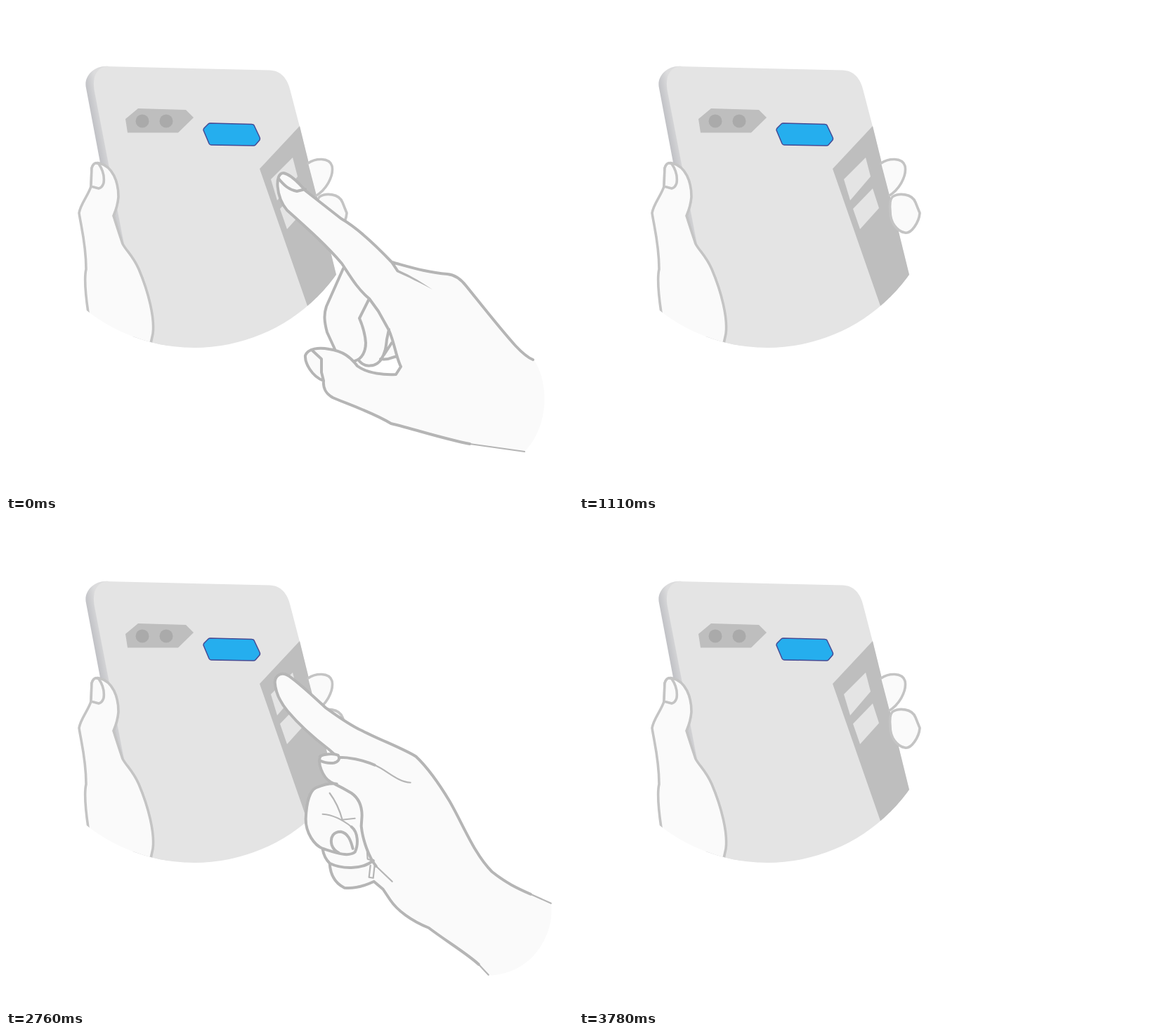
These frames come from a looping animation (807 by 694 pixels, 3950 ms). An HTML page:

```html
<!DOCTYPE html>
<html lang="en">
<head>
<meta charset="utf-8">
<title>Hand tapping a device</title>
<style>
  html, body { margin: 0; width: 100%; height: 100%; overflow: hidden; background: #fff; }
  svg { display: block; width: 807px; height: 694px; }
  path { stroke-linejoin: round; stroke-linecap: round; }
  .skin { fill: #fafafa; }
  .line { fill: none; stroke: #b5b5b5; stroke-width: 4; }
  .thin { fill: none; stroke: #b5b5b5; stroke-width: 2.2; }
  .holder { fill: #fafafa; stroke: #c4c4c4; stroke-width: 3.6; }
</style>
</head>
<body>
<svg viewBox="0 0 807 694">
  <defs>
    <clipPath id="disc"><circle cx="268" cy="239" r="248"/></clipPath>
    <linearGradient id="edge" gradientUnits="userSpaceOnUse" x1="116" y1="152" x2="136" y2="148">
      <stop offset="0" stop-color="#b9babf"/>
      <stop offset="1" stop-color="#dcdcdd"/>
    </linearGradient>
  </defs>

  <g clip-path="url(#disc)">
    <path fill="url(#edge)" d="M146 86C126 84 110 100 114 117L190 520H240Z"/>
    <path fill="#e4e4e4" d="M142 86L375 91.500C391 92 401 103 405 122L418 172L500 505H200L126 122C122 102 129 88 142 86Z"/>
    <path fill="#bebebe" d="M418 171L500 505L456 505L361 232Z"/>
    <path fill="#e4e4e4" d="M408 216L415 243L386 277L377 247ZM418 260L427 288L400 318L390 289Z"/>
    <path fill="#bebebe" d="M170 161L188 146L256 148L267 159L245 180.500H173Z"/>
    <circle cx="194" cy="164" r="9.500" fill="#aaa"/>
    <circle cx="228" cy="164" r="9.500" fill="#aaa"/>
    <path fill="#25aeee" stroke="#454a94" stroke-width="1.500" d="M281 177Q281 175 282 174L288 168Q289 167 291 167L350 168.500Q352 168.500 353 170L361 187Q362 189 361 191L355 198Q354 199 352 199L292 198Q290 198 289 196Z"/>

    <path class="holder" d="M119 450L117 437C113 410 111 388 114 375C114 340 107 315 104 295C106 282 117 270 121 257L122 231Q125 222 133 224C152 229 160 250 160 272C159 285 156 292 153 299C158 315 163 330 166 339C172 350 180 355 189 375C203 408 212 445 209 467L203 495Z"/>
    <path class="holder" d="M121 257L122 231Q125 221 132 225Q141 238 139 252Q137 259 132 260Z"/>
    <path class="holder" d="M430 224C440 217 460 215 464 228C467 243 455 262 442 270"/>
    <path class="holder" d="M446 272C455 266 474 267 479 280L485 295C484 308 473 325 464 323C452 321 443 308 443 293C442 283 443 275 446 272Z"/>
  </g>

  <g id="side" display="none">
    <path class="skin" d="M395 238C405 240 415 250 426 263L477 303C500 316 530 345 549 365C575 372 600 380 628 382C640 383 648 390 655 399C680 430 705 462 725 484Q740 500 752 505C774 540 772 600 738 635L660 624C620 616 585 604 548 595C520 578 480 565 465 558C455 552 451 545 452 534C435 528 425 508 426 498C430 488 445 486 468 489L457 465C453 450 452 440 456 428L480 372C455 340 430 318 400 291C388 275 382 245 395 238Z"/>
    <path fill="#fff" d="M504 512Q520 516 533 504L557 503L562 514L555 525C540 526 515 524 504 512Z"/>
    <path class="line" d="M557 377L549 365C530 345 500 316 477 303L426 263C415 250 405 240 395 238C382 238 384 272 400 291C430 318 455 340 478 367C490 385 500 403 517 417L530 435L545 462C553 480 555 500 562 514L555 525C540 526 515 524 500 513C490 500 480 492 460 489C445 486 430 488 426 498C425 508 435 528 452 534C451 545 455 552 465 558C480 565 520 578 548 595C585 604 620 616 660 624
      M549 365C575 372 600 380 628 382C640 383 648 390 655 399C680 430 705 462 725 484Q740 500 750 504
      M388 246C396 256 403 262 414 264L426 261M436 491L449 503L449 522L452 534
      M480 374L456 428C452 440 453 450 457 465L468 489M496 506C508 503 512 490 512 480C511 465 506 452 503 445L517 417
      M503 506C510 515 525 515 533 505C540 495 541 485 542 475L545 461M533 503C545 505 552 500 556 499M538 497L549 480"/>
    <path class="thin" d="M660 624L738 635"/>
    <path fill="#b5b5b5" d="M555 375C570 381 585 389 607 404C588 394 572 386 556 379Z"/>
  </g>

  <g id="top" display="none">
    <path class="skin" d="M524 552L430 430C405 375 385 325 357 258C345 238 330 205 326 185C324 172 332 167 345 166C357 166 363 173 371 185C398 225 428 275 453 325C470 309 480 294 487 289C496 284 514 288 535 300C546 298 558 306 573 310C592 322 607 350 615 382C622 415 638 437 641 465L645 500C625 535 590 556 524 552Z"/>
    <path class="line" d="M478 491L430 430C405 375 385 325 357 258C345 238 330 205 326 185C324 172 332 167 345 166C357 166 363 173 371 185C398 225 428 275 453 325C470 309 480 294 487 289C496 284 514 288 535 300
      M535 300C546 298 558 306 573 310C592 322 607 350 615 382C622 415 638 437 641 465L644 499
      M351 168L358 184C354 197 346 203 339 204C332 203 330 194 328 182"/>
    <path class="thin" d="M478 491L524 551M453 325Q442 338 429 346M496 321C515 318 523 306 535 300"/>
  </g>

  <g id="pinch" display="none">
    <path class="skin" d="M316 180C317 168 327 166 334 170C345 176 365 195 388 216C410 232 425 242 440 249C465 262 500 275 517 286C535 303 550 325 565 350C585 385 600 425 625 450C650 470 680 480 709 495C715 530 690 595 620 598C600 575 565 553 535 530C510 520 490 505 480 490L470 475L457 464C440 472 425 474 415 473C403 467 395 455 394 438Q386 430 384 417C372 412 360 395 360 375C361 350 365 335 375 330Q388 325 396 323C384 315 376 295 380 285L400 282C375 262 350 240 334 221C325 210 317 195 316 180Z"/>
    <path class="line" d="M400 282L392 275C375 262 350 240 334 221C325 210 317 195 316 180C317 168 327 166 334 170C345 176 365 195 388 216C410 232 425 242 440 249C465 262 500 275 517 286C535 303 550 325 565 350C585 385 600 425 625 450C645 466 660 473 680 482
      M457 464L470 475L480 490C490 505 510 520 535 530C560 549 590 567 606 582
      M408 287C420 287 440 290 458 298M381 285C376 295 384 315 395 322C405 327 412 330 425 338C435 345 440 355 440 370L439 385C441 405 450 430 460 442
      M380 286C385 282 400 281 406 284C410 290 405 294 400 295C390 296 385 294 381 292
      M404 325C396 323 388 325 375 330C365 335 361 350 360 375C360 395 372 412 384 417C400 422 420 430 430 422C435 412 435 394 425 386
      M397 412C394 400 400 393 410 393C420 395 424 405 427 417M397 412Q400 420 407 423
      M384 418Q386 430 394 438C410 446 440 448 456 434M394 438C395 455 403 467 415 473C425 474 440 472 457 464"/>
    <path class="thin" d="M680 482L709 495M606 582L620 597M458 298C475 305 490 322 509 323M460 442L483 464M394 338Q406 354 412 376L430 374M384 368C400 369 415 378 425 386M447 417L448 432L457 435M452 441L450 458L456 459L458 441"/>
  </g>
</svg>

<script>
const LOOP = 3950;

// base: resting translation; from / to: distance from rest when entering / leaving
const hands = [
  { id: "side",  base: [-61, -61], from: [61, 61], to: [61, 61], enter: [0, 510],     leave: [770, 1085],  end: 1110 },
  { id: "top",   base: [0, 0],     from: [93, 77], to: [57, 47], enter: [1270, 1780], leave: [1873, 2428], end: 2500 },
  { id: "pinch", base: [0, 0],     from: [75, 56], to: [75, 56], enter: [2670, 3090], leave: [3275, 3755], end: 3780 }
];

function ease(t, [start, stop]) {
  const u = Math.min(1, Math.max(0, (t - start) / (stop - start)));
  return (1 - Math.cos(Math.PI * u)) / 2;
}

function draw(now) {
  const t = now % LOOP;
  for (const h of hands) {
    const el = document.getElementById(h.id);
    const visible = t >= h.enter[0] && t < h.end;
    el.setAttribute("display", visible ? "inline" : "none");
    if (!visible) continue;
    const away = 1 - ease(t, h.enter), back = ease(t, h.leave);
    const [x, y] = h.base.map((b, i) => b + h.from[i] * away + h.to[i] * back);
    el.setAttribute("transform", `translate(${x} ${y})`);
  }
}

const began = performance.now();
function tick() {
  draw(performance.now() - began);
  requestAnimationFrame(tick);
}
tick();
</script>
</body>
</html>
```
